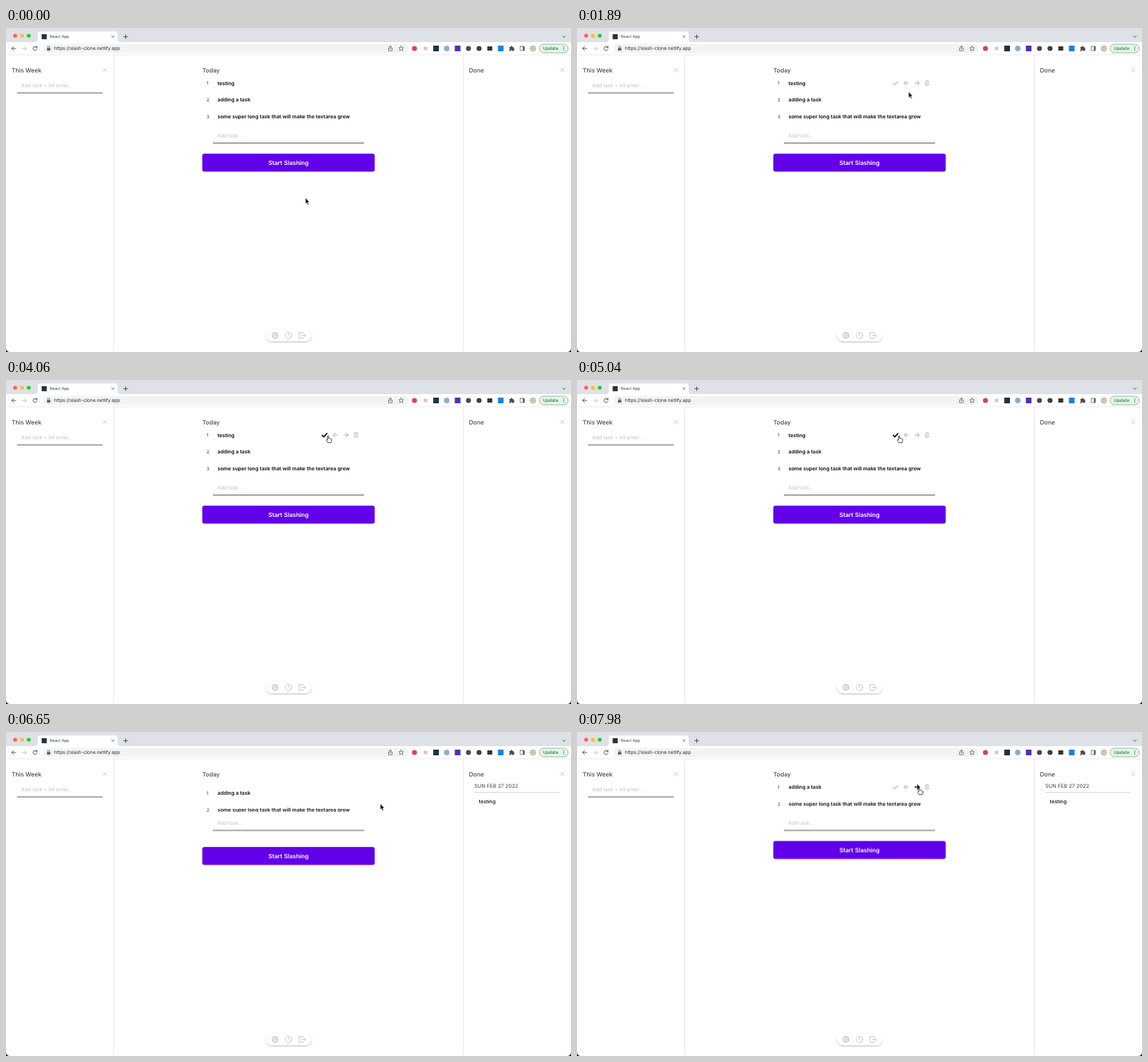
Recreate the animation shown at these times as an HTML page. Size 800 by 459 pixels, loop 8000 ms.

```html
<!DOCTYPE html>
<html lang="en">
<head>
<meta charset="utf-8">
<title>Task list</title>
<style>
html, body { margin: 0; width: 100%; height: 100%; overflow: hidden; background: #1b0b55; }
svg { display: block; width: 800px; height: 459px; }
text { font-family: Inter, "Liberation Sans", sans-serif; text-rendering: geometricPrecision; }
.head { font-size: 8.45px; font-weight: 500; fill: #484848; }
.task { font-size: 7.23px; font-weight: 600; fill: #0a0a0a; }
.num { font-size: 6.3px; font-weight: 500; fill: #444; }
.hint { font-size: 7.2px; fill: #c2c2c2; }
.line { fill: none; stroke-linecap: round; stroke-linejoin: round; }
.ink { stroke: #4a4d51; stroke-width: 1; }
.pale { stroke: #c9c9c9; stroke-width: 1; }

/* every part runs on the same 8 s clock */
.anim { animation: 8s linear infinite; }
.step { animation-timing-function: step-end; }

#cursor { animation-name: cursor; }
@keyframes cursor {
  0%, 12.25% { transform: translate(424px, 241px); animation-timing-function: ease-in; }
  14.4% { transform: translate(443px, 205px); }
  16.6%, 16.9% { transform: translate(466px, 171.5px); }
  20% { transform: translate(472px, 120px); }
  23% { transform: translate(470px, 92px); animation-timing-function: ease-out; }
  30.6%, 33.2% { transform: translate(466px, 82px); animation-timing-function: ease-in-out; }
  36.6%, 64.8% { transform: translate(456px, 79px); animation-timing-function: ease-in-out; }
  72.6% { transform: translate(529.5px, 102px); }
  84% { transform: translate(530px, 102px); animation-timing-function: ease-in-out; }
  93.6%, 100% { transform: translate(484.5px, 79px); }
}
#arrow { animation-name: arrow; }
@keyframes arrow {
  0% { opacity: 1; } 14.4% { opacity: 0; } 16.2% { opacity: 1; }
  28% { opacity: 0; } 66.6% { opacity: 1; } 91.5%, 100% { opacity: 0; }
}
#hand { animation-name: hand; }
@keyframes hand {
  0% { opacity: 0; } 14.4% { opacity: 1; } 16.2% { opacity: 0; }
  28% { opacity: 1; } 66.6% { opacity: 0; } 91.5%, 100% { opacity: 1; }
}

#start { animation-name: glow; }
@keyframes glow {
  0%, 14.4% { fill: #6200ea; } 15.6%, 16.7% { fill: #762fff; } 18.4%, 100% { fill: #6200ea; }
}

#actions { animation-name: actions; }
@keyframes actions {
  0% { opacity: 0; transform: translateY(47.4px); }
  19% { opacity: 1; transform: translateY(47.4px); }
  20.4% { opacity: 1; transform: translateY(23.7px); }
  23.2% { opacity: 1; transform: none; }
  67.2% { opacity: 0; transform: none; }
  89.5%, 100% { opacity: 1; transform: none; }
}
#check { animation-name: check; }
@keyframes check {
  0% { stroke: #c9c9c9; } 35% { stroke: #000; } 66.6%, 100% { stroke: #c9c9c9; }
}
#next { animation-name: next; }
@keyframes next {
  0% { stroke: #c9c9c9; } 92.6%, 100% { stroke: #000; }
}

#strike { animation-name: strike; transform-origin: 299.5px 78px; }
@keyframes strike {
  0%, 64.6% { transform: scaleX(0); opacity: 1; }
  69%, 75.5% { transform: none; opacity: 1; }
  79%, 100% { transform: none; opacity: 0; }
}
#first { animation-name: first; }
@keyframes first { 0%, 69% { opacity: 1; } 72.8%, 100% { opacity: 0; } }
#firstNum { animation-name: firstNum; }
@keyframes firstNum { 0%, 75.5% { opacity: 1; } 79%, 100% { opacity: 0; } }
.before { animation-name: before; }
.after { animation-name: after; }
@keyframes before { 0% { opacity: 1; } 68.5%, 100% { opacity: 0; } }
@keyframes after { 0% { opacity: 0; } 68.5%, 100% { opacity: 1; } }

.slide { animation-name: slide; }
@keyframes slide {
  0%, 80.5% { transform: none; animation-timing-function: ease-in; }
  83.1% { transform: translateY(-15px); animation-timing-function: ease-out; }
  87%, 100% { transform: translateY(-23.6px); }
}
#field { animation-name: jump; }
@keyframes jump { 0% { transform: none; } 80.5%, 100% { transform: translateY(-23.6px); } }

#done { animation-name: done; }
@keyframes done { 0%, 68.5% { opacity: 0; } 74%, 100% { opacity: 1; } }
</style>
</head>
<body>
<svg viewBox="0 0 800 459">
  <defs>
    <clipPath id="window"><path d="M0 0H800V453Q800 459 794 459H6Q0 459 0 453Z"/></clipPath>
    <filter id="soft" x="-20%" y="-40%" width="140%" height="190%">
      <feDropShadow dx="0" dy="1" stdDeviation="1" flood-opacity=".28"/>
    </filter>
    <path id="cross" class="line" d="M-2.6-2.6 2.6 2.6M2.6-2.6-2.6 2.6"/>
    <path id="way" class="line" d="M-3 0H3M.3-2.8 3.1 0 .3 2.8"/>
  </defs>
  <rect width="800" height="459" fill="#1b0b55"/>
  <g clip-path="url(#window)">
    <rect width="800" height="459" fill="#fff"/>

    <!-- browser frame -->
    <rect width="800" height="20" fill="#dee1e6"/>
    <circle cx="13" cy="11" r="2.8" fill="#fe5f57"/>
    <circle cx="22.6" cy="11" r="2.8" fill="#febc2e"/>
    <circle cx="32.2" cy="11" r="2.8" fill="#28c840"/>
    <path d="M41 20Q45 20 45 16V8.500Q45 5 48.500 5H154.500Q158 5 158 8.500V16Q158 20 162 20Z" fill="#fff"/>
    <rect x="50.500" y="8.700" width="7.200" height="7.200" fill="#20323c"/>
    <text x="62" y="14.300" font-size="5.650" fill="#3c4043">React App</text>
    <use href="#cross" transform="translate(151.500 12.300) scale(.68)" class="ink"/>
    <path class="line ink" d="M166.700 12.300H172.300M169.500 9.500V15.100M788 11.500 789.900 13.400 791.800 11.500"/>
    <use href="#way" class="ink" transform="translate(11 29) scale(-.95 .95)"/>
    <use href="#way" transform="translate(26 29) scale(.95)" stroke="#bfc2c5"/>
    <path class="line ink" d="M43.500 27.300A2.900 2.900 0 1 0 44 29.800M43.900 25.800V27.800H41.900"/>
    <rect x="52" y="22.800" width="518" height="12.600" rx="6.300" fill="#f1f3f4"/>
    <rect x="58" y="28.200" width="4.800" height="3.800" rx=".5" fill="#5f6368"/>
    <path class="line" d="M59 28V27.200A1.400 1.400 0 0 1 61.800 27.200V28" stroke="#5f6368" stroke-width=".8"/>
    <text x="68" y="31.200" font-size="6.620" fill="#27292c">https://slash-clone.netlify.app</text>
    <g class="line" stroke="#5f6368" stroke-width=".8">
      <path d="M542.900 28.200H541.600V32.300H546.900V28.200H545.600M544.250 30.300V25.400M542.800 26.800 544.250 25.400 545.700 26.800"/>
      <path d="M559.500 25.500 560.500 27.800 563 28 561.100 29.700 561.700 32.200 559.500 30.900 557.300 32.200 557.900 29.700 556 28 558.500 27.800Z"/>
      <rect x="728" y="26" width="6" height="6" rx=".6"/>
    </g>
    <rect x="731.700" y="26" width="2.500" height="6" fill="#5f6368"/>
    <circle cx="578.300" cy="29" r="3.600" fill="#e0405a"/>
    <rect x="591.500" y="26.500" width="5" height="5" fill="#c8ccd0"/>
    <rect x="605" y="25" width="8" height="8" fill="#20323c"/>
    <circle cx="624" cy="29" r="3.900" fill="#8cafd2"/>
    <rect x="635.500" y="25" width="8" height="8" fill="#5a2ca8"/>
    <circle cx="654.800" cy="29" r="3.500" fill="#45484c"/>
    <circle cx="669.800" cy="29" r="3.600" fill="#3c4043"/>
    <rect x="681.500" y="26" width="7" height="6" fill="#333"/>
    <rect x="696.500" y="25" width="8" height="8" fill="#1c82dc"/>
    <path d="M712.600 27H714.400A1.400 1.400 0 0 1 717.200 27H718.700V28.700A1.300 1.300 0 0 1 718.700 31.300V32.800H716.800A1.200 1.200 0 0 0 714.400 32.800H712.600V31A1.200 1.200 0 0 0 712.600 28.700Z" fill="#4a4d51"/>
    <circle cx="746" cy="29" r="4.600" fill="#d2c4aa"/>
    <rect x="755" y="22.900" width="41" height="12.300" rx="6.150" fill="#e8f3ea" stroke="#75b285" stroke-width=".8"/>
    <text x="760.300" y="31.200" font-size="6.300" font-weight="500" fill="#188038">Update</text>
    <g fill="#188038"><circle cx="789.700" cy="26.700" r=".7"/><circle cx="789.700" cy="29" r=".7"/><circle cx="789.700" cy="31.300" r=".7"/></g>
    <path d="M0 38H800" stroke="#e4e5e7" stroke-width=".8"/>

    <!-- side columns -->
    <path d="M152.500 38.500V457M647.500 38.500V457" stroke="#e7e7e7"/>
    <text class="head" x="8" y="62.600">This Week</text>
    <text class="head" x="278" y="62.600">Today</text>
    <text class="head" x="655.500" y="62.600">Done</text>
    <use href="#cross" class="pale" transform="translate(140 59.500)"/>
    <use href="#cross" class="pale" transform="translate(787.500 59.500)"/>
    <text class="hint" x="21.500" y="84.200">Add task + hit enter...</text>
    <path d="M15.500 92H137" stroke="#555"/>
    <g id="done" class="anim">
      <text x="663" y="78.600" font-size="7.350" fill="#444">SUN FEB 27 2022</text>
      <path d="M663 85.500H784" stroke="#ccc" stroke-width=".8"/>
      <text class="task" x="669.500" y="100.700" style="font-weight:500">testing</text>
    </g>

    <!-- task rows -->
    <text id="firstNum" class="num anim" x="284" y="80.300">1</text>
    <text id="first" class="task anim" x="299.500" y="80.700">testing</text>
    <rect id="strike" class="anim" x="299.500" y="77" width="24.600" height="2.200" fill="#0b9ca1"/>
    <g class="slide anim">
      <text class="num before anim step" x="284" y="104">2</text>
      <text class="num after anim step" x="284" y="104">1</text>
      <text class="task" x="299.500" y="104.400">adding a task</text>
      <text class="num before anim step" x="284" y="127.700">3</text>
      <text class="num after anim step" x="284" y="127.700">2</text>
      <text class="task" x="299.500" y="128.100">some super long task that will make the textarea grow</text>
    </g>
    <g id="field" class="anim step">
      <rect x="293" y="136.600" width="214" height="26" fill="#fff"/>
      <text class="hint" x="299" y="155">Add task...</text>
      <path d="M293 163H507" stroke="#444"/>
    </g>
    <g class="slide anim">
      <rect id="start" class="anim" x="278" y="178" width="244" height="25.400" rx="3" fill="#6200ea"/>
      <text x="400" y="193.700" font-size="8.450" font-weight="600" fill="#fff" text-anchor="middle">Start Slashing</text>
    </g>
    <g id="actions" class="anim step">
      <path id="check" class="line anim step" d="M447.800 78.300 450 80.600 454.400 75.800" stroke-width="1.700"/>
      <use href="#way" transform="translate(466.300 78) scale(-1 1)" stroke="#c9c9c9" stroke-width="1.500"/>
      <g id="next" class="anim step"><use href="#way" transform="translate(481.600 78)" stroke-width="1.500"/></g>
      <path class="line pale" d="M492.700 75.500H498.700M494.500 75.300V74.500H496.900V75.300M493.300 76V81.400H498.100V76M494.900 77.400V80M496.500 77.400V80"/>
    </g>

    <!-- bottom bar -->
    <rect x="368" y="427" width="64.500" height="17" rx="8.500" fill="#fff" filter="url(#soft)"/>
    <g class="line pale">
      <circle cx="381" cy="435.500" r="4" stroke-width="1.300" stroke-dasharray="2.300 .84"/>
      <circle cx="381" cy="435.500" r="3.400"/>
      <circle cx="381" cy="435.500" r="1.300"/>
      <circle cx="400.200" cy="435.500" r="4.600"/>
      <path d="M400.200 432.800V435.700L402 437.200"/>
      <path d="M420.800 433.200V431.500H415V439.500H420.800V437.800M418 435.500H424M422.200 433.700 424 435.500 422.200 437.300"/>
    </g>
  </g>

  <g id="cursor" class="anim">
    <path id="arrow" class="anim step" d="M0-.5V8.200L1.900 6.500 3.200 9.500 4.700 8.800 3.400 5.900H6Z" fill="#000" stroke="#fff" stroke-width=".7"/>
    <path id="hand" class="anim step" d="M-.8 1Q-.8 0 0 0T.8 1V3.700Q1.600 3 2.400 3.900 3.200 3.400 3.800 4.300 5 4.100 5 5.300V7.200Q5 8.500 4.200 9.800H-.2Q-.9 8.300-2.300 6.700-2.700 5.500-1.700 5.400L-.8 6.100Z" fill="#fff" stroke="#111" stroke-width=".8" stroke-linejoin="round"/>
  </g>
</svg>
</body>
</html>
```
